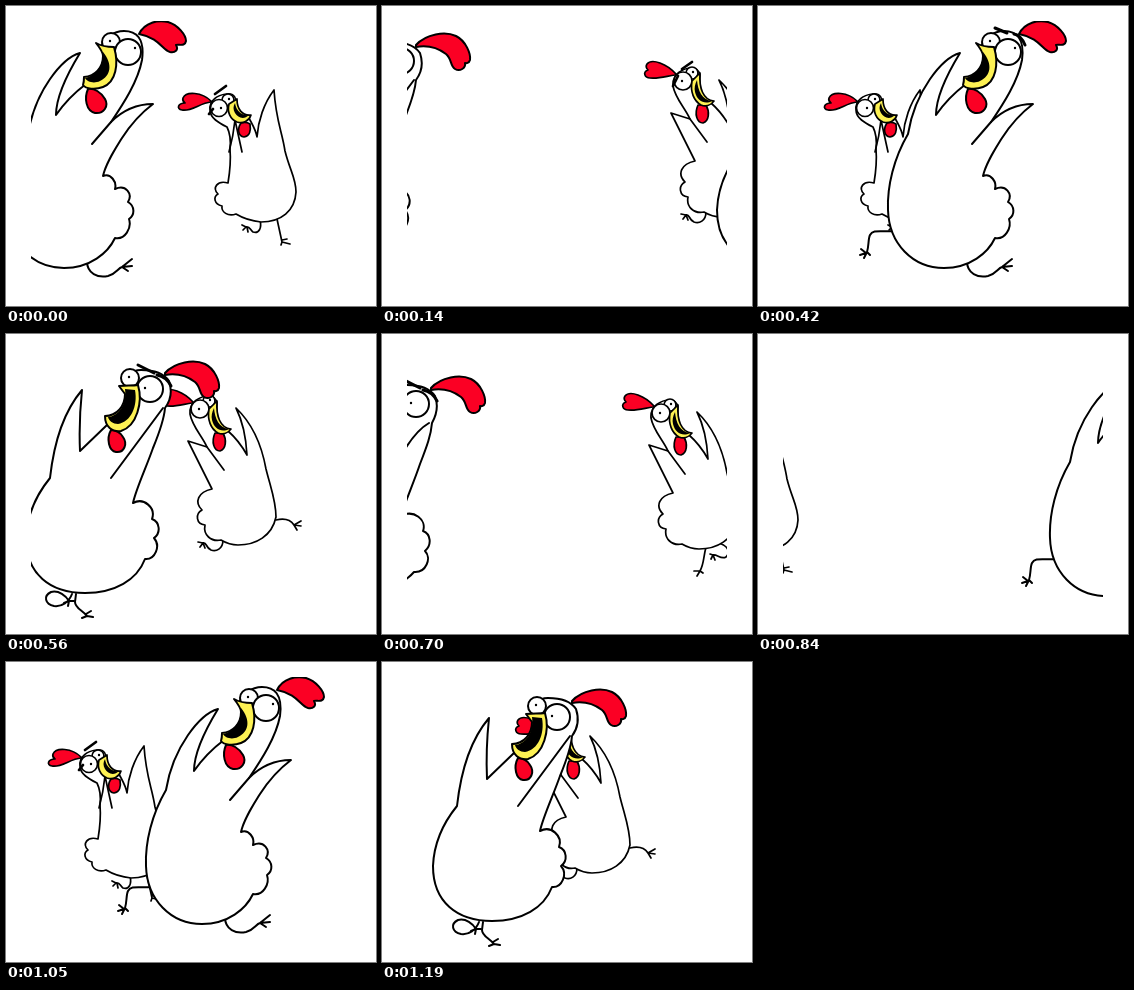
Write an HTML page with a canvas that moves like this. It is 370 by 300 pixels and loops after 1.26 s.

```html
<!DOCTYPE html>
<html lang="en">
<head>
<meta charset="utf-8">
<title>Running chickens</title>
<style>
html, body { margin: 0; width: 100%; height: 100%; overflow: hidden; background: #fff; }
canvas { display: block; }
</style>
</head>
<body>
<canvas id="stage" width="370" height="300"></canvas>
<script>
const ctx = document.getElementById('stage').getContext('2d');
const STEP = 70, FRAMES = 18;
const FILL = { white: '#fff', red: '#fb0024', yellow: '#fdf153', black: '#000' };

const part = (kind, d) => ({ kind, path: new Path2D(d) });
const white = d => part('white', d);
const red = d => part('red', d);
const yellow = d => part('yellow', d);
const black = d => part('black', d);
const line = d => part('line', d);
const brow = d => part('brow', d);
const disc = (x, y, r) => `M${x - r} ${y}a${r} ${r} 0 1 0 ${2 * r} 0a${r} ${r} 0 1 0 ${-2 * r} 0Z`;
const eye = (x, y, r, px, py) => [white(disc(x, y, r)), black(disc(px, py, 1.2))];
const shift = (x, y, parts) => parts.map(p => {
  const path = new Path2D();
  path.addPath(p.path, new DOMMatrix([1, 0, 0, 1, x, y]));
  return { kind: p.kind, path };
});

// Big bird: stretched pose
const bigStretch = [
  line('M137 225C122 226 115 223 112 229C110 233 111 240 109 246M103 243L108 247L102 249M109 246L106 252M109 246L112 249'),
  line('M209 255C209 268 220 272 230 270C238 268 240 262 244 261L254 253M244 261L254 260M244 261L250 265'),
  red('M261 28C267 16 280 14 290 16C300 19 308 29 308 35C307 41 301 38 298 39C301 44 297 47 292 46C284 44 282 32 261 28Z'),
  white('M202 47C184 52 157 85 150 128C136 152 129 180 130 204C131 238 155 262 186 262C212 262 230 247 237 232C247 234 254 222 251 213C257 209 257 200 250 196C255 188 248 178 237 183C239 176 233 167 225 170C228 157 236 145 244 132C253 118 263 107 275 98C258 98 243 106 233 116C246 97 260 75 264 54C267 32 258 25 246 25C236 25 225 32 223 42C233 58 224 74 208 78C196 87 187 96 178 109C178 90 191 65 202 47Z'),
  line('M233 116L214 138'),
  red('M210 83C206 92 208 105 217 107C226 108 231 100 227 93C223 86 216 82 210 83Z'),
  ...eye(233, 36, 9, 232, 35),
  ...eye(250, 46, 13, 257, 42),
  yellow('M218 37C223 40 230 41 236 41C241 58 238 76 225 81C217 84 208 83 205 79C206 76 206 74 206 71C217 70 225 62 225 50C225 47 222 42 218 37Z'),
  black('M225 46C235 58 233 70 222 75C216 78 209 76 207 72C217 70 226 60 225 46Z'),
  brow('M237 22L249 27M256 28C261 29 265 34 267 39')
];

// Big bird: head thrown back, shared by the two other poses
const bigComb = red('M190 39C200 28 219 25 230 30C240 35 245 48 244 54C243 58 239 57 239 57C240 62 234 66 229 63C224 60 226 53 220 48C212 42 201 39 190 41Z');
const bigHead = [
  ...eye(155, 44, 9, 154, 43),
  ...eye(175, 55, 13, 170, 54),
  yellow('M144 52C151 51 157 52 163 51C168 68 162 92 146 97C137 98 130 93 130 82C142 82 150 72 150 60Z'),
  black('M150 55L160 56C163 72 156 88 143 90C138 90 134 87 133 83C144 82 152 70 150 55Z'),
  brow('M163 31L179 39M182 41C188 42 193 46 196 52')
];

const bigBack = [
  line('M97 260C94 268 87 273 79 272C70 270 68 262 76 258C84 256 91 262 94 267M94 267L89 269M94 267L93 272M94 267L99 267'),
  line('M101 260L100 268C100 274 107 276 112 282M112 282L107 284M112 282L118 283M111 280L116 277'),
  bigComb,
  white('M107 56C90 76 79 108 75 144C62 160 52 180 51 204C51 240 75 259 110 259C140 259 162 246 170 225C180 226 186 212 179 204C186 199 185 188 177 185C181 174 169 163 158 169C161 155 171 134 178 114C185 97 189 86 190 74C196 66 197 56 194 47C188 38 177 36 166 36C156 36 150 42 150 52C156 68 148 84 133 90L105 117C104 95 105 75 107 56Z'),
  line('M188 74L136 144'),
  red('M136 96C131 105 134 117 141 118C149 119 153 110 148 103C145 98 141 96 136 96Z'),
  ...bigHead
];

const bigUp = [
  line('M259 251C254 262 253 270 255 280M255 280L247 283M255 280L252 285M255 280L258 284M255 280L248 279'),
  line('M283 258C276 265 276 272 284 272C294 272 295 265 303 268M303 268L307 265M303 268L301 273M303 268L306 270'),
  ...shift(177, 15, [bigComb]),
  white('M267 62C264 92 258 120 254 155C239 172 232 190 232 212C233 241 258 258 290 258C318 258 340 250 350 238C362 239 368 224 361 217C368 211 367 200 359 197C363 186 350 175 337 182C341 168 350 148 356 130C363 112 367 101 368 89C373 80 374 70 371 62C365 53 354 51 343 51C333 51 327 57 327 67C333 83 325 99 310 105C300 114 290 123 283 131C281 105 272 82 267 62Z'),
  line('M365 89C346 100 332 130 321 155'),
  red('M314 107C312 114 318 122 328 121C337 121 339 112 335 108C328 109 320 109 314 107Z'),
  ...shift(177, 15, bigHead)
];

// Small bird
const smallStretch = [
  line('M254 214C256 222 253 228 247 226C244 224 244 220 240 221M240 221L236 219M240 221L237 224M241 221L242 226'),
  line('M271 213L276 236M276 236L284 238M276 234L281 233M276 236L275 239'),
  red('M205 95C196 86 180 85 177 92C176 95 179 97 179 97C172 97 170 103 176 104C185 106 194 97 205 96Z'),
  white('M268 84C270 115 276 125 279 145C284 165 290 172 290 186C289 205 275 216 255 216C245 215 235 211 230 208C222 211 215 206 216 200C208 198 207 191 212 188C206 182 211 174 222 177C224 165 225 155 224 143C225 134 224 127 221 121C213 117 204 112 204 104C203 94 212 89 220 88C225 87 229 89 230 94C229 103 235 112 243 112C246 118 250 124 251 131C252 115 258 97 268 84Z'),
  line('M223 146C226 135 228 124 229 114L236 146'),
  red('M235 117C231 123 232 130 238 131C244 130 245 124 244 118C241 116 238 116 235 117Z'),
  ...eye(222, 94, 6, 223, 93),
  ...eye(213, 102, 8.5, 215, 102),
  yellow('M223 98L231 93C231 103 236 110 245 109C243 115 237 118 231 116C224 113 221 106 223 98Z'),
  black('M229 97C230 105 236 110 243 109C238 114 232 112 229 107C227 104 227 100 229 97Z'),
  brow('M203 108L207 103M209 88L220 80')
];

const smallBody = [
  red('M187 68C178 58 163 52 158 58C156 61 159 64 159 64C153 66 156 72 161 72C170 73 178 70 186 69Z'),
  white('M230 74C248 91 256 113 260 135C265 155 270 167 270 183C266 202 250 211 232 211C226 211 220 209 215 206C205 208 197 201 199 191C190 190 189 180 196 176C188 168 192 158 206 155L182 107L201 113C196 102 186 92 184 80C183 68 194 62 203 62C208 62 210 65 211 69C210 83 213 94 222 97C230 104 236 112 241 121C240 103 236 86 230 74Z'),
  line('M201 113L218 136'),
  red('M209 99C205 108 208 117 214 117C220 115 221 106 217 99Z'),
  ...eye(203, 67, 6, 204, 66),
  ...eye(194, 75, 9, 193, 75),
  yellow('M203 75L211 67C210 82 214 94 225 95C222 99 217 101 212 99C205 95 201 86 203 75Z'),
  black('M208 74C209 85 213 94 223 95C216 99 208 95 206 86C205 82 206 78 208 74Z'),
  brow('M184 80L189 70M193 63L203 56')
];

const smallBack = [
  line('M270 186C278 184 284 185 288 191M288 191L295 187M288 191L295 192M288 191L291 196'),
  line('M217 206C217 215 210 218 205 216C199 213 201 208 197 209M197 209L192 208M197 209L194 213M197 209L199 214'),
  ...smallBody
];

const smallUp = [
  line('M53 213C50 225 51 230 47 237M47 237L41 237M47 237L44 242M47 237L50 239'),
  line('M66 209C75 212 78 218 73 223C68 226 64 220 60 221M60 221L57 220M60 221L58 225M60 221L62 226'),
  ...shift(-186, 4, smallBody)
];

// Poses in running order, brought to a common place
const big = [bigStretch, shift(-104, 0, bigUp), shift(76, 0, bigBack)];
const small = [smallStretch, shift(207, 0, smallUp), shift(21, 0, smallBack)];

// Each run: first step, last step, [step, x] points for both birds
const runs = [
  { from: 2, to: 11, angryBig: true,
    big: [[4, 104], [6, 0], [8, -107]],
    small: [[4, -207], [6, -106], [8, -21]] },
  { from: 11, to: 21, angryBig: false,
    big: [[12, 162], [15, 10], [17, -76], [18, -128]],
    small: [[12, -250], [15, -130], [17, -43], [18, 0]] }
];

function along(keys, step) {
  let i = 0;
  while (i < keys.length - 2 && step > keys[i + 1][0]) i++;
  const [s0, x0] = keys[i], [s1, x1] = keys[i + 1];
  return x0 + (x1 - x0) * (step - s0) / (s1 - s0);
}

function drawBird(parts, x, width, angry) {
  ctx.save();
  ctx.translate(x, 0);
  for (const { kind, path } of parts) {
    if (kind === 'brow' && !angry) continue;
    if (FILL[kind]) {
      ctx.fillStyle = FILL[kind];
      ctx.fill(path);
    }
    if (kind === 'black') continue;
    ctx.lineWidth = kind === 'brow' ? width + 1 : width;
    ctx.stroke(path);
  }
  ctx.restore();
}

function draw(now) {
  const frame = Math.floor(now / STEP) % FRAMES;
  ctx.fillStyle = '#fff';
  ctx.fillRect(0, 0, 370, 300);
  ctx.save();
  ctx.beginPath();
  ctx.rect(25, 15, 320, 270);
  ctx.clip();
  ctx.lineCap = ctx.lineJoin = 'round';
  const active = [];
  for (const run of runs)
    for (const step of [frame, frame + FRAMES])
      if (step >= run.from && step <= run.to) active.push([run, step]);
  for (const [run, step] of active)
    drawBird(small[step % 3], along(run.small, step), 1.7, !run.angryBig);
  for (const [run, step] of active)
    drawBird(big[step % 3], along(run.big, step), 2, run.angryBig);
  ctx.restore();
}

const start = performance.now();
function tick() {
  draw(performance.now() - start);
  requestAnimationFrame(tick);
}
tick();
</script>
</body>
</html>
```
